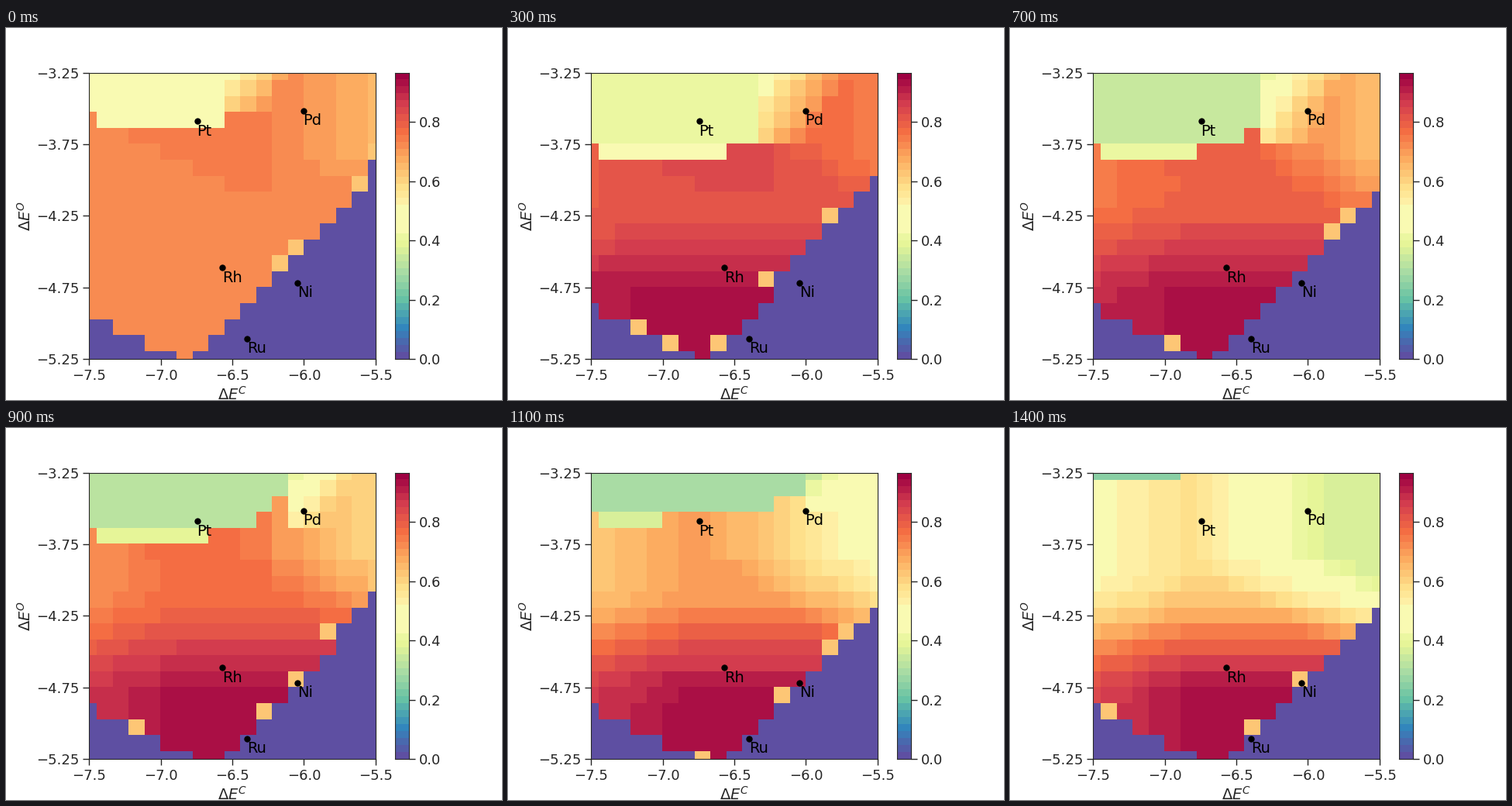
Animation, 640 px wide and 480 px high, one loop 1.5 s. Source, as a matplotlib script:

```python
import matplotlib.pyplot as plt
import numpy as np
from matplotlib.animation import FuncAnimation
from matplotlib.colors import ListedColormap

INK = "#262626"
N = 19           # grid points per axis
TOP = 40         # highest colour level
VMAX = 0.967
FRAMES = 15
ROW, COL = np.mgrid[0:N, 0:N]   # rows count down from the top

plt.rcParams.update({
    "font.family": "DejaVu Sans", "text.color": INK, "axes.edgecolor": INK,
    "axes.labelcolor": INK, "axes.linewidth": 0.8, "axes.labelsize": 14,
    "axes.labelpad": 2.2, "xtick.labelsize": 13, "ytick.labelsize": 13,
    "xtick.color": INK, "ytick.color": INK,
    "xtick.major.size": 6, "ytick.major.size": 6,
    "xtick.major.width": 1, "ytick.major.width": 1,
})

colors = plt.get_cmap("Spectral_r")(np.linspace(0, 1, TOP + 1))
colors[18:22, :3] = np.array([249, 250, 178]) / 255   # one flat pale band
CMAP = ListedColormap(colors)


def smoothstep(u):
    u = np.clip(u, 0, 1)
    return u * u * (3 - 2 * u)


def plateau(step, s):
    """Middle level that heats toward the bottom and fades to both sides."""
    mid = np.interp(step, [0, 3, 9, 11, 14], [29.7, 34.2, 32, 28.5, 24])
    hot = np.interp(step, [0, 3], [29.7, 39])
    start = 9 - 3 * s
    level = mid + (hot - mid) * smoothstep((ROW - start) / (14.5 - start))
    ridge = (COL >= 2 * ROW - 5 - min(2, step)) & (COL <= 11) & (ROW <= 7)
    level += 1.2 * (1 - s) * ridge
    edge = 13 - 0.5 * step + 1.4 * np.maximum(0, ROW - 5)
    level -= (0.45 + 0.5 * s) * np.maximum(0, COL - edge)
    level -= 0.6 * s * np.maximum(0, 6 - COL)
    return np.maximum(level, 15)


def add_cap(level, step):
    """Cool cap in the upper left, with a ramp up to the plateau beside it."""
    depth = np.interp(step, [0, 3, 7, 9, 14], [4, 6, 6, 5, 1])
    width = np.interp(step, [0, 3, 7, 12, 14], [9.5, 11, 11, 15, 6])
    cool = 19 - 0.65 * step
    ramp = cool + 3 + 2.2 * (COL - width) + 8 / depth * ROW
    beside = (COL >= width - 0.5) & (ROW < depth - 1)
    level = np.where(beside, np.minimum(level, ramp), level)

    end = width * (1 - (np.minimum(ROW, depth) / depth) ** (10 - 0.6 * step))
    last = (ROW == np.ceil(depth) - 1) & (ROW > 0)
    inside = (COL < np.rint(end)) & ~(last & (COL == 0))
    return np.where(inside, np.where(last, min(cool + 3, 19), cool), level)


def levels(step):
    """Colour levels of the whole map at one time step."""
    s = step / (FRAMES - 1)
    level = add_cap(plateau(step, s), step)

    reach = 24.8 + 2.2 * min(1, step / 11)
    right = np.rint(reach + 0.05 * (ROW - 12) - ROW)
    left = np.rint(2 * (ROW - 15) + min(1, step / 5))
    rim = (COL == right - 1) | ((COL == left) & (ROW > 14))
    pale = np.random.default_rng(step).random((N, N)) < 0.25
    level = np.where(rim & pale, np.minimum(level, 26), level)
    return np.where((COL >= left) & (COL < right), np.rint(level), 0)


fig = plt.figure(figsize=(6.4, 4.8), dpi=100, facecolor="white")
ax = fig.add_axes([107.2 / 640, 0.11, 369.6 / 640, 0.77])
half = 1 / (N - 1)
image = ax.imshow(levels(0), cmap=CMAP, vmin=0, vmax=TOP, aspect="auto",
                  interpolation="nearest",
                  extent=(-7.5 - half, -5.5 + half, -5.25 - half, -3.25 + half))
ax.set(xlim=(-7.5, -5.5), ylim=(-5.25, -3.25),
       xticks=np.linspace(-7.5, -5.5, 5), yticks=np.linspace(-5.25, -3.25, 5),
       xlabel=r"$\Delta E^{C}$", ylabel=r"$\Delta E^{O}$")

METALS = {"Pt": (-6.746, -3.590), "Pd": (-6.002, -3.517), "Rh": (-6.568, -4.613),
          "Ni": (-6.043, -4.716), "Ru": (-6.395, -5.106)}
for name, xy in METALS.items():
    ax.plot(*xy, "o", color="black", markersize=6, markeredgewidth=0)
    ax.annotate(name, xy, xytext=(-0.5, -18.5), textcoords="offset pixels",
                va="baseline", color="black", fontsize=14)

bar = fig.add_axes([501.6 / 640, 0.11, 18.48 / 640, 0.77])
bar.imshow(np.arange(TOP + 1)[:, None], cmap=CMAP, vmin=0, vmax=TOP, aspect="auto",
           origin="lower", interpolation="nearest", extent=(0, 1, 0, VMAX))
bar.set(xticks=[], yticks=np.arange(0, 0.9, 0.2))
bar.yaxis.tick_right()


def draw(step):
    image.set_data(levels(step))
    return [image]


anim = FuncAnimation(fig, draw, frames=FRAMES, interval=100, repeat=True,
                     repeat_delay=0)
plt.show()
```
